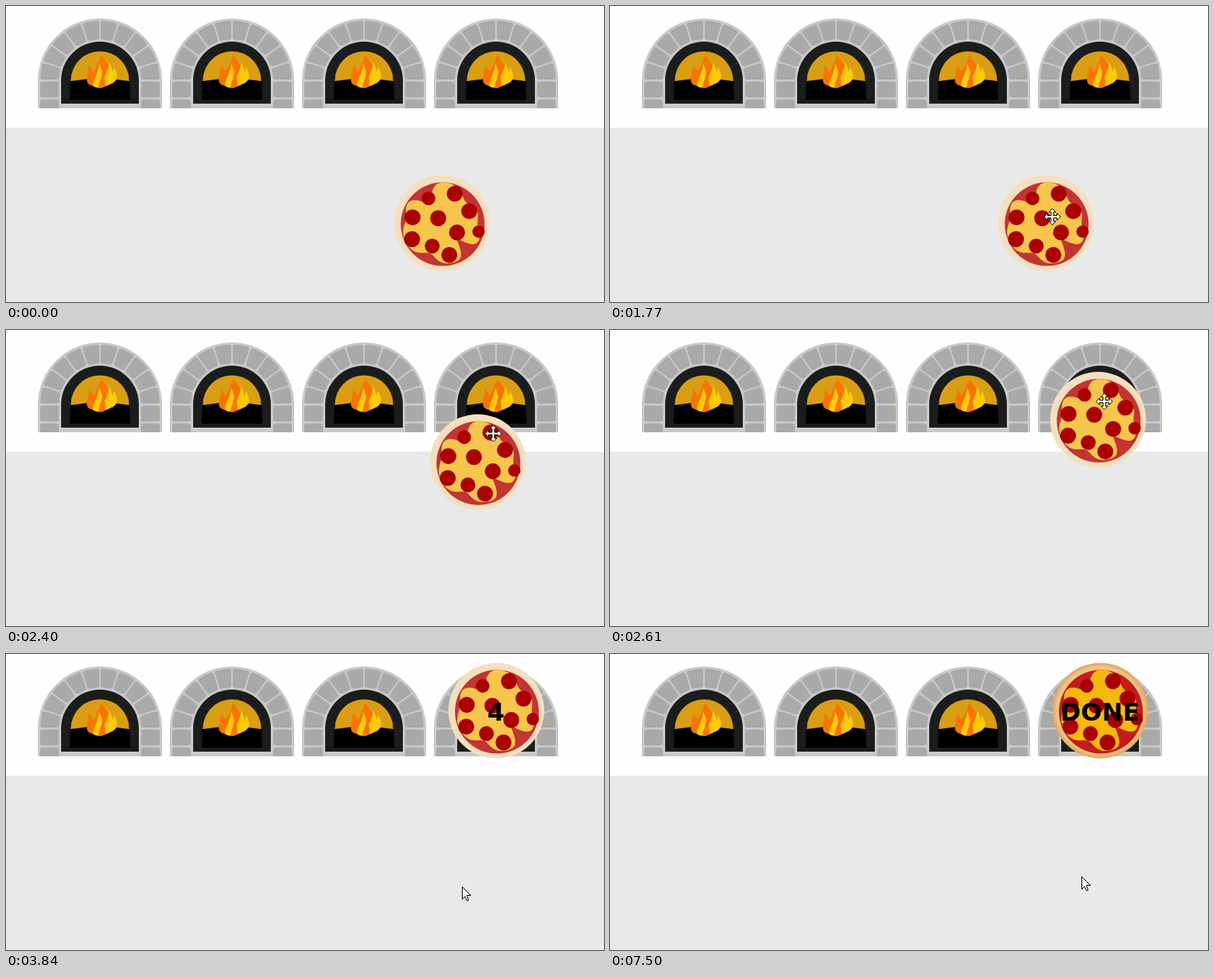
Write an HTML page with a canvas that moves like this. It is 770 by 382 pixels and loops after 8000 ms.

```html
<!DOCTYPE html>
<html lang="en">
<head>
<meta charset="utf-8">
<title>Pizza oven</title>
<style>
html, body { margin: 0; width: 100%; height: 100%; overflow: hidden; background: #fefefe; }
canvas { display: block; }
</style>
</head>
<body>
<canvas id="stage" width="770" height="382"></canvas>
<script>
const ctx = document.getElementById('stage').getContext('2d');
const LOOP = 8000, STEP = 30, LAG = 100;
const DROP = 2880, COUNT = 2900, SECOND = 912, DONE = 7500;
const TAU = Math.PI * 2, DEG = TAU / 360;

const EDGE = [755, 89], GRAB = [569.5, 272], OVEN = [636.5, 88];
const REST = [587, 300], END = [607, 287];

const arrow = new Path2D('M.5.5V16.5L4 13L6.5 18.5L8.5 17.8L6.5 11.5H11.5Z');
const mover = new Path2D();
for (let i = 0; i < 4; i++) {
  const c = Math.round(Math.cos(i * TAU / 4)), s = Math.round(Math.sin(i * TAU / 4));
  for (const [x, y] of [[-1.5, -1.5], [-1.5, -6], [-4.5, -6], [0, -10.5], [4.5, -6], [1.5, -6]]) {
    mover.lineTo(x * c - y * s, x * s + y * c);
  }
}
mover.closePath();

// the last slices shrink step by step
const pepperoni = [
  [16.3, -38], [35, -15.5], [-38, -7.5], [-5, -6.3], [19.3, 12],
  [-38.7, 20.7], [9.3, 41], [-12.7, 29.6], [-17.5, -32], [47, 11]
];
// angle, depth and width of the bites in the cheese edge
const bites = [[0, 7, 11], [47, 24, 7], [112, 11, 12], [187, 6, 12], [238, 25, 11], [318, 12, 15]];
const raw = { rim: ['#f4dfbf', '#f4dfbf'], sauce: '#c33434', cheese: '#f6c64c', meat: '#aa0000' };
const baked = { rim: ['#f1c486', '#dba35d'], sauce: '#c41c1c', cheese: '#f5b90d', meat: '#a90000' };

const clamp = v => Math.min(1, Math.max(0, v));
const span = (t, a, b) => clamp((t - a) / (b - a));
const smooth = u => u * u * (3 - 2 * u);
const mix = (a, b, u, v = u) => [a[0] + (b[0] - a[0]) * u, a[1] + (b[1] - a[1]) * v];

function disc(x, y, r, color) {
  ctx.fillStyle = color;
  ctx.beginPath();
  ctx.arc(x, y, r, 0, TAU);
  ctx.fill();
}

function arch(r, bottom, color) {
  ctx.fillStyle = color;
  ctx.beginPath();
  ctx.moveTo(-r, bottom);
  ctx.arc(0, 96, r, Math.PI, 0);
  ctx.lineTo(r, bottom);
  ctx.fill();
}

function drawBricks() {
  ctx.fillStyle = ctx.strokeStyle = '#a9a9a9';
  ctx.lineWidth = 6;
  ctx.lineJoin = 'round';
  const path = new Path2D();
  for (let i = 0; i < 10; i++) {
    const a = Math.PI + i * Math.PI / 10, b = a + Math.PI / 10;
    const brick = new Path2D();
    brick.arc(0, 96, 74, a + 4 / 74, b - 4 / 74);
    brick.arc(0, 96, 56, b - 4 / 56, a + 4 / 56, true);
    brick.closePath();
    path.addPath(brick);
  }
  for (const x of [-74, 56]) {
    path.rect(x, 100.5, 18, 14.5);
    path.rect(x, 123.5, 18, 14.5);
  }
  ctx.fill(path);
  ctx.stroke(path);
}

function tongue(color, x, tipX, tipY, w) {
  const base = 106 - x * x / 25;
  ctx.fillStyle = color;
  ctx.beginPath();
  ctx.moveTo(x, base);
  ctx.bezierCurveTo(x - 2 * w, base - 3, tipX - w * 0.2, tipY + 18, tipX, tipY);
  ctx.bezierCurveTo(tipX + w * 0.9, tipY + 13, x + 2 * w, base - 4, x, base);
  ctx.fill();
}

function drawFlame() {
  const orange = '#f97400', yellow = '#ffca0a';
  tongue(orange, -8, -14, 75, 7);
  tongue(yellow, 10, 18, 78, 7);
  tongue(orange, 0, 1, 63, 13);
  tongue(yellow, 9, 12, 72, 6);
  tongue(yellow, -4, -1, 74, 6);
  tongue(orange, 2, 3, 82, 4);
}

function drawOven(x) {
  ctx.save();
  ctx.beginPath();
  ctx.rect(x - 80, 0, 160, 132);
  ctx.clip();
  ctx.translate(x, 0);
  arch(80, 132, '#c9c9c9');
  drawBricks();
  arch(50, 126, '#1b1d1c');
  arch(37.5, 99, '#d99e13');
  ctx.fillStyle = '#000';
  ctx.beginPath();
  ctx.moveTo(-38, 97);
  ctx.quadraticCurveTo(0, 90, 38, 97);
  ctx.lineTo(39, 121);
  ctx.lineTo(-39, 121);
  ctx.fill();
  drawFlame();
  ctx.restore();
}

function drawCheese(color) {
  ctx.fillStyle = color;
  ctx.beginPath();
  for (let deg = 0; deg < 360; deg += 2) {
    const r = bites.reduce((sum, [at, depth, width]) =>
      sum - depth * Math.exp((Math.cos((deg - at) * DEG) - 1) / (width * DEG) ** 2), 53);
    ctx.lineTo(r * Math.cos(deg * DEG), r * Math.sin(deg * DEG));
  }
  ctx.fill();
}

function drawPizza([x, y], look) {
  ctx.save();
  ctx.translate(x, y);
  const rim = ctx.createRadialGradient(0, 0, 56, 0, 0, 62);
  look.rim.forEach((color, i) => rim.addColorStop(i, color));
  disc(0, 0, 61.7, rim);
  disc(0.8, 1.4, 54, look.sauce);
  drawCheese(look.cheese);
  pepperoni.forEach(([px, py], i) => disc(px, py, Math.min(10.3, 16 - 0.8 * (i + 1)), look.meat));
  ctx.restore();
}

function drawLabel(text) {
  ctx.font = 'bold 32px "DejaVu Sans", sans-serif';
  ctx.textAlign = 'center';
  ctx.fillStyle = '#000';
  ctx.fillText(text, 631, 86);
}

function drawCursor([x, y], shape) {
  ctx.save();
  ctx.translate(x, y);
  ctx.lineJoin = 'miter';
  ctx.lineWidth = 1;
  ctx.strokeStyle = '#000';
  ctx.fillStyle = '#fff';
  ctx.fill(shape);
  ctx.stroke(shape);
  ctx.restore();
}

// the hand bends sideways a little before it reaches the oven
function dragged(t) {
  const p = smooth(span(t, 1760, 2690) ** 1.05);
  return mix(GRAB, OVEN, clamp(p * 1.15), p);
}

function pointer(t) {
  if (t < 1740) return mix(EDGE, GRAB, 1 - (1 - span(t, 150, 960)) ** 1.6);
  if (t < 3030) return dragged(t);
  if (t < 5640) return mix(OVEN, REST, smooth(span(t, 3030, 3840)));
  return mix(REST, END, smooth(span(t, 5640, 5850)));
}

function pizzaAt(t) {
  if (t >= DROP) return [631.3, 73.1];
  const [x, y] = dragged(t - LAG);
  return [x - 8, y + 8.2];
}

function label(t) {
  if (t < COUNT) return '';
  return t < DONE ? String(Math.max(1, 5 - Math.floor((t - COUNT) / SECOND))) : 'DONE';
}

function draw(t) {
  ctx.fillStyle = '#fefefe';
  ctx.fillRect(0, 0, 770, 157);
  ctx.fillStyle = '#e9e9e9';
  ctx.fillRect(0, 157, 770, 225);
  for (let i = 0; i < 4; i++) drawOven(121 + i * 170);
  const pizza = pizzaAt(t);
  drawPizza(pizza, t < DONE ? raw : baked);
  drawLabel(label(t));
  if (t < 150) return;
  const tip = pointer(t);
  const over = tip.every((v, i) => Math.abs(v - pizza[i]) < 62);
  drawCursor(tip, over ? mover : arrow);
}

const start = performance.now();
function tick() {
  const t = Math.max(0, performance.now() - start) % LOOP;
  draw(Math.floor(t / STEP) * STEP);
  requestAnimationFrame(tick);
}
tick();
</script>
</body>
</html>
```
